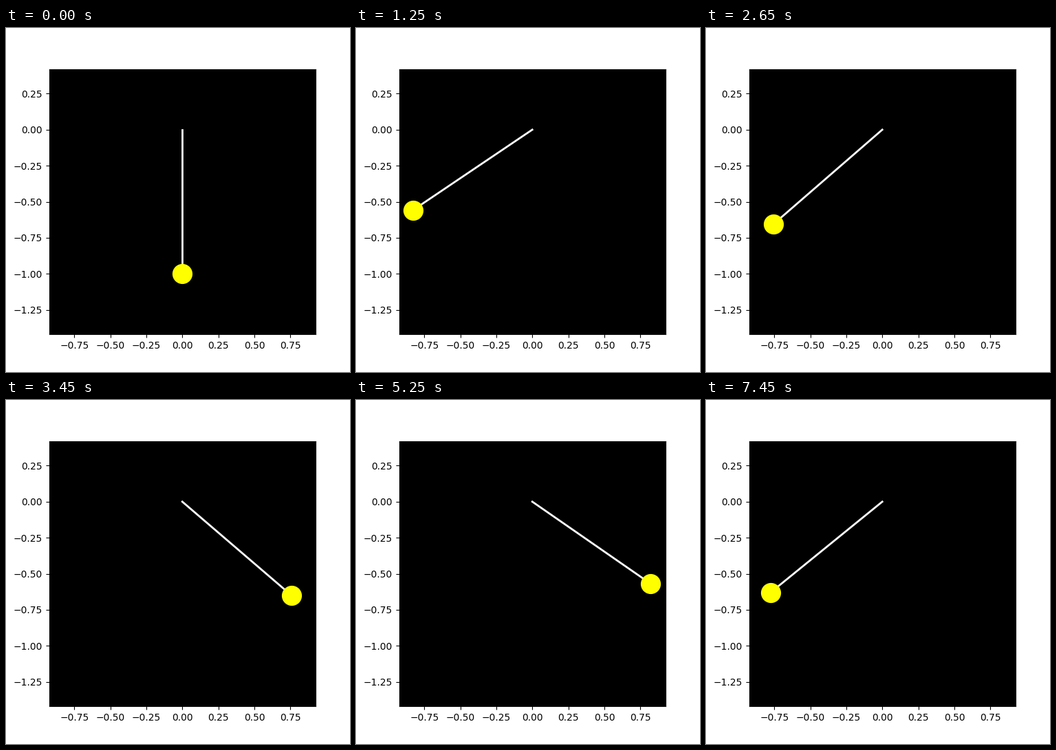
A matplotlib script for the animation above (7.5 s loop, 500 by 500 pixels).

```python
import numpy as np
import matplotlib.pyplot as plt
from matplotlib.animation import FuncAnimation

FRAMES = 150
INTERVAL = 50
G, LENGTH = 9.8, 1.0
SUBSTEPS = 20


def deriv(state):
    theta, omega = state
    return np.array([omega, -G / LENGTH * np.sin(theta)])


def rk4(state, h):
    k1 = deriv(state)
    k2 = deriv(state + h / 2 * k1)
    k3 = deriv(state + h / 2 * k2)
    k4 = deriv(state + h * k3)
    return state + h / 6 * (k1 + 2 * k2 + 2 * k3 + k4)


def swing(theta, omega, times):
    """Angles of a free pendulum at evenly spaced times."""
    h = (times[1] - times[0]) / SUBSTEPS
    state = np.array([theta, omega])
    angles = [theta]
    for _ in times[1:]:
        for _ in range(SUBSTEPS):
            state = rk4(state, h)
        angles.append(state[0])
    return np.array(angles)


angles = swing(0.0, 3.0, np.linspace(0, 10, FRAMES))
xs, ys = LENGTH * np.sin(angles), -LENGTH * np.cos(angles)

fig, ax = plt.subplots(figsize=(5, 5), dpi=100)
ax.set_facecolor("black")

# Equal scale on both axes, with y centred on the rod at rest
margin = 0.05 * np.ptp(xs)
left, right = xs.min() - margin, xs.max() + margin
box = ax.get_position()
half = (right - left) * box.height / box.width / 2
ax.set_xlim(left, right)
ax.set_ylim(-LENGTH / 2 - half, -LENGTH / 2 + half)

rod, = ax.plot([0, xs[0]], [0, ys[0]], color="white", lw=2)
bob, = ax.plot([xs[0]], [ys[0]], "o", color="yellow", markersize=20)


def update(i):
    rod.set_data([0, xs[i]], [0, ys[i]])
    bob.set_data([xs[i]], [ys[i]])
    return rod, bob


anim = FuncAnimation(fig, update, frames=FRAMES, interval=INTERVAL,
                     repeat=True, repeat_delay=0)
plt.show()
```
